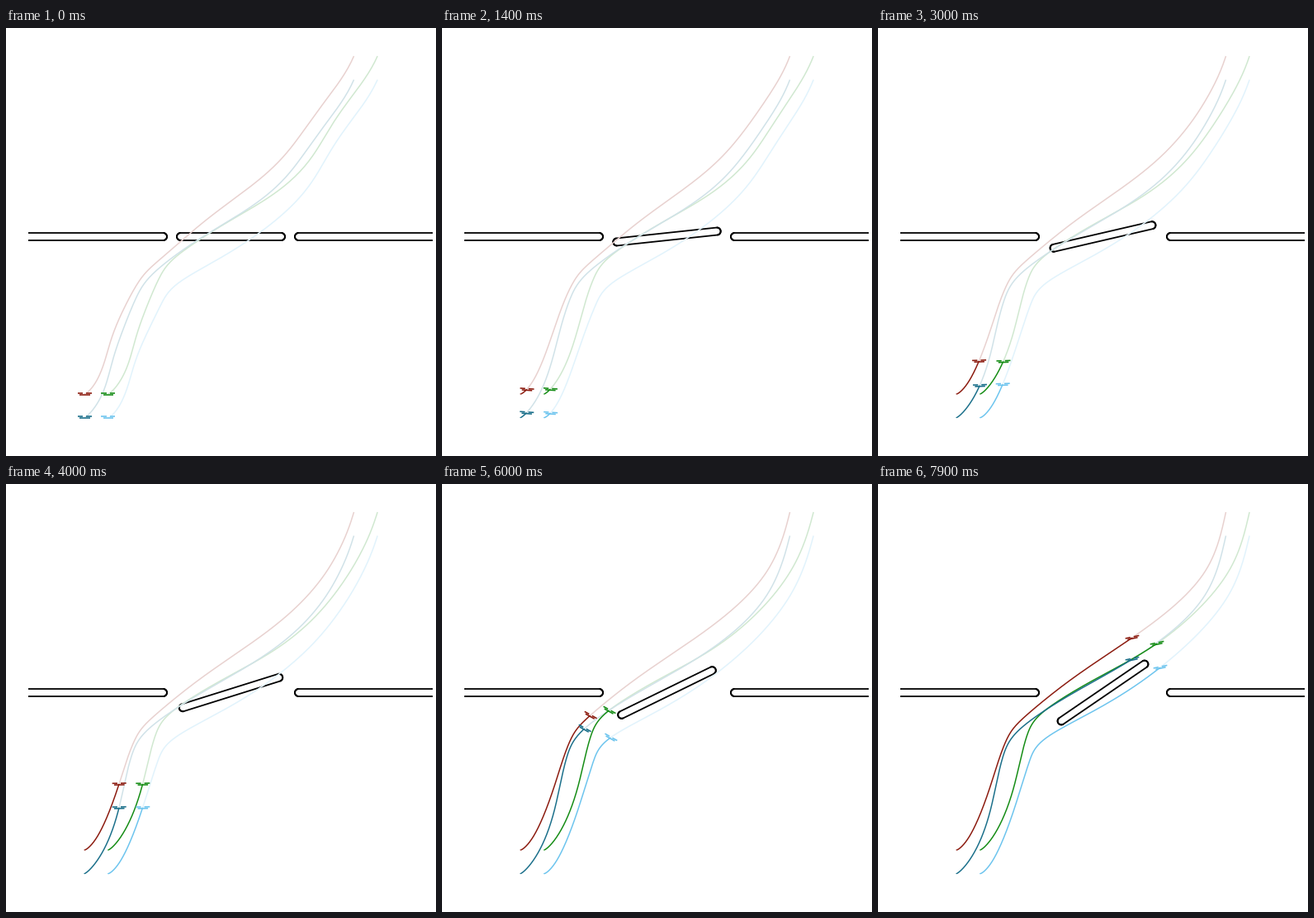
These frames come from a looping animation (521x518 px, 8 s). A matplotlib script:

```python
import numpy as np
import matplotlib.pyplot as plt
from matplotlib.animation import FuncAnimation

W, H, DPI = 521, 518, 100
FRAMES, STEP = 80, 100
PX = 72 / DPI
SPIN = 0.0758            # gate turn, rad/s
MID = np.array([272.5, 252.5])
ARM, RADIUS = 61, 4.5    # gate half length and cap radius

# The drones fly as a square: shared take-off and landing, own way past the gate.
START, GOAL, SPACING = np.array([95, 442.5]), np.array([421.5, 34]), 28.6
TAKE_OFF = np.array([[14.5, -14], [0, 0], [14.5, -14], [42, -79.5]])
LANDING = np.array([[-26, 73], [0, 0]])
KNOTS = np.array([-2, 0, 2, 4, 5.2, 6.05, 6.7, 7.9, 9.3, 10.4])  # seconds
END = KNOTS[-1]

# dark, pale, column, row, way points past the gate
DRONES = [
    ("#8b1a0e", "#e8d1cf", 0, 0, [(157, 307), (182, 278), (224, 244), (308, 186)]),
    ("#148c14", "#d0e8d0", 1, 0, [(181, 303), (205, 272), (251, 243), (338, 193)]),
    ("#1a6f8a", "#d0e2e8", 0, 1, [(152, 328), (175, 294), (218, 264), (308, 212)]),
    ("#6cc4ee", "#e1f3fc", 1, 1, [(183.5, 335.5), (207, 305), (257, 277), (342, 222)]),
]
TILT_T = [0, 0.7, 2, 4, 5.2, 6.7, 7.9]
TILT = [0, 12, -3, -1, 38, 22, -12]  # degrees


def spline(t, p):
    """Natural cubic spline through points p at times t, as a function."""
    h, n = np.diff(t), len(t)
    a, b = np.eye(n), np.zeros_like(p)
    for i in range(1, n - 1):
        a[i, i - 1:i + 2] = h[i - 1], 2 * (h[i - 1] + h[i]), h[i]
        b[i] = 6 * ((p[i + 1] - p[i]) / h[i] - (p[i] - p[i - 1]) / h[i - 1])
    m = np.linalg.solve(a, b)

    def at(q):
        k = np.clip(np.searchsorted(t, q) - 1, 0, n - 2)
        g, u, v = (z[:, None] for z in (h[k], t[k + 1] - q, q - t[k]))
        return ((m[k] * u**3 + m[k + 1] * v**3) / (6 * g)
                + (p[k] / g - m[k] * g / 6) * u
                + (p[k + 1] / g - m[k + 1] * g / 6) * v)

    return at


def flight(col, row, gate_points):
    offset = SPACING * np.array([col, row])
    return spline(KNOTS, np.vstack([START + offset + TAKE_OFF, gate_points,
                                    GOAL + offset + LANDING]))


def bump(x, center, width):
    return np.exp(-((x - center) / width) ** 2 / 2)


def fade(t, end):
    return max(0, 1 - t / end) ** 1.5


def bend(climb, t):
    """Sideways error of the plan made at time t; it dies out as t grows."""
    low = -5 * fade(t, 2) * bump(climb, 70, 28)
    shoulder = 7 * fade(t, 5) * bump(climb, 168, 32)
    top = -23 * fade(t, 7.9) * bump(climb, 332, 42)
    span = START[1] - GOAL[1]
    return (low + shoulder + top) * (1 - np.clip(climb / span, 0, 1) ** 20)


def rotate(p, angle):
    c, s = np.cos(angle), np.sin(angle)
    return p @ np.array([[c, s], [-s, c]])


def cap(cx, side):
    """Half circle at cx, from top to bottom, bulging to one side."""
    a = np.linspace(-np.pi / 2, np.pi / 2, 24)
    return np.column_stack([cx + side * RADIUS * np.cos(a), RADIUS * np.sin(a)])


fig = plt.figure(figsize=(W / DPI, H / DPI), dpi=DPI, facecolor="white")
ax = fig.add_axes([0, 0, 1, 1])
ax.set_xlim(0, W)
ax.set_ylim(H, 0)
ax.axis("off")


def stroke(color, width, z):
    return ax.plot([], [], color=color, lw=width * PX, zorder=z,
                   solid_capstyle="butt")[0]


for edge, end, side in ((27, 190.5, 1), (517, 354.5, -1)):
    arc = cap(end, side)
    wall = np.vstack([[edge, -RADIUS], arc, [edge, RADIUS]])
    for part, width in ((wall, 1.8), (arc, 2)):
        stroke("black", width, 1).set_data(*(part + [0, MID[1]]).T)

ARCS = [cap(ARM, 1), cap(-ARM, -1)]
GATE = [np.vstack([ARCS[0], ARCS[1][::-1], ARCS[0][:1]]), *ARCS]
gate = [stroke("black", width, 1) for width in (1.8, 2, 2)]

GAP = [np.nan, np.nan]
BODY = np.array([[-6, 1.1], [6.5, 1.1], GAP, [-8.3, -0.8], [-2, -0.8], GAP,
                 [2, -0.8], [8.7, -0.8]])

paths = [flight(*d[2:]) for d in DRONES]
plans = [stroke(d[1], 1.5, 2) for d in DRONES]
trails = [stroke(d[0], 1.5, 3) for d in DRONES]
bodies = [stroke(d[0], 1.6, 4) for d in DRONES]


def draw(i):
    t = i * STEP / 1000
    for line, part in zip(gate, GATE):
        line.set_data(*(rotate(part, -SPIN * t) + MID).T)

    body = rotate(BODY, np.radians(np.interp(t, TILT_T, TILT)))
    for path, plan, trail, drone in zip(paths, plans, trails, bodies):
        past = path(np.linspace(0, t, 200))
        ahead = path(np.linspace(t, END, 200))
        ahead[:, 0] += bend(past[0, 1] - ahead[:, 1], t)
        trail.set_data(*past.T)
        plan.set_data(*ahead.T)
        drone.set_data(*(body + past[-1]).T)
    return [*gate, *plans, *trails, *bodies]


anim = FuncAnimation(fig, draw, frames=FRAMES, interval=STEP, repeat=True,
                     repeat_delay=0, blit=False)
plt.show()
```
